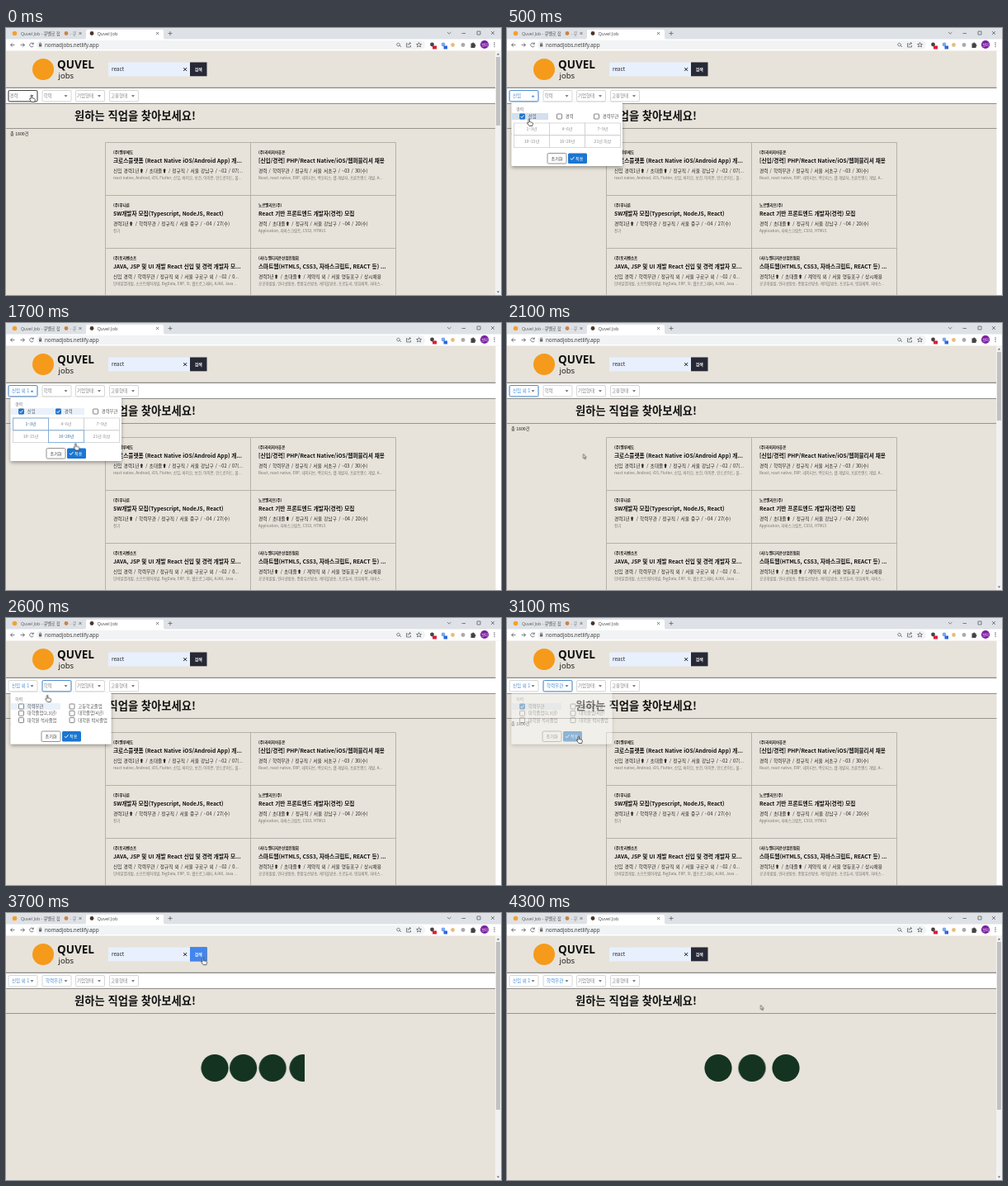
These frames come from a looping animation (600 px wide and 323 px high, 4400 ms). An HTML page:

```html
<!DOCTYPE html>
<html lang="ko">
<head>
<meta charset="utf-8">
<title>Job search</title>
<style>
  html, body { margin: 0; width: 100%; height: 100%; overflow: hidden; background: #e7e3da; }
  svg { display: block; width: 100%; height: 100%; }
  text { font-family: "Noto Sans CJK KR", "Noto Sans CJK", "DejaVu Sans", sans-serif; white-space: pre; }
  .ui { font-family: "Open Sans", "Noto Sans CJK KR", sans-serif; }
  .mid { text-anchor: middle; }
  .bold { font-weight: 700; }
  .meta { word-spacing: .5px; }
  .icon { fill: none; stroke: #5f6368; stroke-width: .8; }
</style>
</head>
<body>
<svg id="stage" viewBox="0 0 600 323"></svg>
<script>
const LOOP = 4400;
const BLUE = '#3f87d2', GRAY = '#808085', INK = '#111';

const rect = (x, y, w, h, fill, more = '') =>
  `<rect x="${x}" y="${y}" width="${w}" height="${h}" fill="${fill}" ${more}/>`;
const text = (x, y, size, str, fill = INK, cls = '') =>
  `<text x="${x}" y="${y}" font-size="${size}" fill="${fill}" class="${cls}">${str}</text>`;
const path = (d, more = 'class="icon"') => `<path d="${d}" ${more}/>`;
const dot = (x, y, r, fill) => `<circle cx="${x}" cy="${y}" r="${r}" fill="${fill}"/>`;
// Visible only between the given pairs of times (ms).
const during = (times, body) => `<g data-on="${times}">${body}</g>`;
const cross = (x, y, r) => path(`M${x - r} ${y - r}l${2 * r} ${2 * r}m0 ${-2 * r}l${-2 * r} ${2 * r}`);

function browser() {
  return rect(0, 0, 600, 14, '#dee1e6') + rect(0, 13.5, 600, 14, '#fff') +
    path('M94 14q3 0 3-3V4q0-2 2-2h90q2 0 2 2v7q0 3 3 3z', 'fill="#fff"') +
    dot(10.5, 6.5, 2.8, '#f5a02c') + text(18, 8.6, 5.2, 'Quvel Job - 큐벨로 잡', '#555', 'ui') +
    dot(73, 6.5, 2.4, '#c98445') + text(77.5, 8.6, 5.2, '- 큐', '#888', 'ui') + cross(90, 6.5, 1.5) +
    dot(104, 6.5, 2.4, '#4a3529') + text(110.5, 8.6, 5.6, 'Quvel Job', '#444', 'ui') + cross(183.5, 6.5, 1.5) +
    path('M196.5 6.5h5m-2.5-2.5v5M535 5l2.2 2.2L539.4 5M552.5 6.5h4.5M571 4h4v4h-4z') + cross(590, 6, 2) +
    path('M10.5 20.5H5.5m2.3-2.3l-2.3 2.3l2.3 2.3M17.5 20.5h5m-2.3-2.3l2.3 2.3l-2.3 2.3M33 19a2.4 2.4 0 1 0 .3 2.5m0-4v2h-2') +
    rect(37, 15, 471, 11, '#f1f3f4', 'rx="5.5"') +
    rect(40, 19.7, 3.2, 2.8, '#666') + path('M40.6 20v-1a1 1 0 0 1 2 0v1') +
    text(47, 22.7, 6.3, 'nomadjobs.netlify.app', '#333', 'ui') +
    path('M477 21l2 2M475.5 18.3a1.8 1.8 0 1 0 .1 0M486.5 18.5h-1v4.5h5v-2M487 21q0-2.5 3.5-2.5m-1.5-1.5l1.5 1.5l-1.5 1.5') +
    path('M500.5 17.5l.9 2h2.1l-1.6 1.4l.6 2.1l-2-1.2l-2 1.2l.6-2.1l-1.6-1.4h2.1z') +
    dot(516.5, 20, 2.4, '#444') + rect(517, 21.5, 5, 4, '#d81e3a') +
    dot(530, 20, 2.4, '#7ba8ef') + rect(530.5, 21.5, 4.5, 4, '#2b66df') +
    dot(541.5, 20.5, 2.4, '#e9bd78') + dot(554, 20.5, 2.4, '#a9a9ae') +
    path('M563.5 18.5h1.7a1 1 0 1 1 2 0h1.3v1.8a1 1 0 1 1 0 2v1.7h-5z', 'fill="#444"') +
    dot(580, 20, 5.1, '#7b1fa2') + text(580, 21.6, 4.2, '보미', '#fff', 'mid') +
    [18, 20.3, 22.6].map(y => dot(592, y, .7, '#555')).join('');
}

function header() {
  const button = fill => rect(223, 41.5, 20.5, 16.8, fill) + text(233.2, 51.8, 4.9, '검색', '#fff', 'mid bold');
  return dot(45, 50, 13, '#f59a1b') +
    text(62, 48.8, 13.5, 'QUVEL', INK, 'ui bold') + text(63.5, 60.8, 9.6, 'jobs', INK, 'ui') +
    rect(124, 41.5, 99, 16.8, '#e8f0fe') + text(128, 52.2, 6.4, 'react', '#222') +
    path('M215.2 48l4 4m0-4l-4 4', 'fill="none" stroke="#222"') +
    button('#282936') + during('3500 3800', button('#4285ee'));
}

function select(x, label, states) {
  const arrow = path(`M${x + 26.5} 81.2h4l-2 2.2z`, 'fill="#666"');
  return rect(x, 75.5, 35, 13.4, '#fff', 'rx="1.5" stroke="#ccc" stroke-width=".8"') + arrow +
    states.map(([times, value]) => during(times, value
      ? text(x + 4, 83.8, 5.5, value, BLUE) : text(x + 1.4, 83.8, 5.5, label, GRAY))).join('');
}
const outline = (x, color) => rect(x, 75.5, 35, 13.4, 'none', `rx="1.5" stroke="${color}" stroke-width=".9"`);

function filters() {
  return rect(0, 72, 600, 19.5, '#fff') +
    rect(0, 71.8, 600, .9, '#5c5a58') + rect(0, 91, 600, .8, '#767370') + rect(0, 121, 600, .8, '#85817c') +
    select(3, '경력', [['0 400'], ['400 800', '신입'], ['800 4400', '신입 외 1']]) +
    select(44, '학력', [['0 2700'], ['2700 4400', '학력무관']]) +
    select(84.5, '기업형태', [['0 4400']]) + select(125.5, '고용형태', [['0 4400']]) +
    during('0 100', outline(3, '#333')) + during('100 2300', outline(3, BLUE)) +
    during('2300 3300', outline(44, BLUE)) +
    during('100 1900', rect(28, 80, 7, 4.5, '#fff') + path('M29.5 83.4h4l-2-2.2z', `fill="${BLUE}"`)) +
    text(83, 110.6, 13.3, '원하는 직업을 찾아보세요!', INK, 'bold');
}

// company, title, details, tags
const jobs = [
  ['(주)벨루에도', '크로스플랫폼 (React Native iOS/Android App) 개...',
    '신입 경력1년⬆ / 초대졸⬆ / 정규직 / 서울 강남구 / ~02 / 07(...',
    'react native, Android, iOS, Flutter, 신입, 바이오, 보건, 아이폰, 안드로이드, 풀...'],
  ['(주)라미지아휴온', '[신입/경력] PHP/React Native/iOS/웹퍼블리셔 채용',
    '경력 / 학력무관 / 정규직 / 서울 서초구 / ~03 / 30(수)',
    'React, react native, ERP, 네이티브, 백오피스, 웹 개발자, 프론트엔드 개발, A...'],
  ['(주)푸나른', 'SW개발자 모집(Typescript, NodeJS, React)',
    '경력1년⬆ / 학력무관 / 정규직 / 서울 중구 / ~04 / 27(수)', '전기'],
  ['노르벨리프(주)', 'React 기반 프론트엔드 개발자(경력) 모집',
    '경력 / 초대졸⬆ / 정규직 / 서울 강남구 / ~04 / 20(수)',
    'Application, 자바스크립트, CSS3, HTML5'],
  ['(주)토리벤소프', 'JAVA, JSP 및 UI 개발 React 신입 및 경력 개발자 모...',
    '신입 경력 / 학력무관 / 정규직 외 / 서울 구로구 외 / ~02 / 0...',
    '모바일앱개발, 소프트웨어개발, BigData, ERP, SI, 웹프로그래머, AJAX, Java ...'],
  ['(사)누벨디지온산업인협회', '스마트웹(HTML5, CSS3, 자바스크립트, REACT 등) ...',
    '경력5년⬆ / 초대졸⬆ / 계약직 외 / 서울 영등포구 / 상시채용',
    '공공개발발, 인터넷방송, 종합유선방송, 케이블방송, 프로듀서, 영화제작, 자바스...'],
];

function results() {
  const cards = jobs.map(([company, title, details, tags], i) => {
    const x = i % 2 ? 306 : 130, y = 138.5 + 64 * (i >> 1);
    return text(x, y + 13, 4.5, company, INK, 'bold') +
      text(x, y + 24.5, 6.65, title, INK, 'bold') +
      text(x, y + 36, 5.7, details, '#222', 'meta') +
      text(x, y + 44.6, 4.5, tags, '#77736e');
  }).join('');
  return text(5, 130, 5.2, '총 1800건', '#222') +
    path('M120.5 323V138.5h352V323M296.5 138.5V323M120.5 202.5h352M120.5 266.5h352',
      'fill="none" stroke="#b0aca6" stroke-width=".9"') + cards;
}

function scrollbar() {
  const thumb = h => rect(594, 35, 5, h, '#c1c1c1');
  return rect(593, 27.5, 7, 295.5, '#f1f1f1') +
    path('M594.8 32.5l1.7-2l1.7 2zM594.8 318.5l1.7 2l1.7-2z', 'fill="#666"') +
    during('0 3700', thumb(83)) + during('3700 4400', thumb(203));
}

function option(x, y, label, checkedAt) {
  const box = rect(x - 3, y - 3, 6, 6, '#fff', 'rx=".8" stroke="#666" stroke-width=".8"');
  const tick = rect(x - 3.3, y - 3.3, 6.6, 6.6, '#1976d2', 'rx=".8"') +
    path(`M${x - 2} ${y}l1.4 1.5l2.6-3`, 'fill="none" stroke="#fff"');
  return box + (checkedAt ? during(`${checkedAt} 4400`, tick) : '') + text(x + 7.3, y + 2, 5.3, label, '#555');
}

function actions(x, y) {
  return rect(x, y, 23, 12.5, '#fff', 'rx="1.5" stroke="#777" stroke-width=".8"') +
    text(x + 11.5, y + 8.1, 5.1, '초기화', '#333', 'mid') +
    rect(x + 25, y, 23, 12.5, '#1976d2', 'rx="1.5"') +
    path(`M${x + 28} ${y + 6.2}l1.5 1.7l3-3.5`, 'fill="none" stroke="#fff"') +
    text(x + 34, y + 8.1, 5.1, '적용', '#fff');
}

const panel = (w, h) => rect(5.5, 90, w, h, '#fff', 'rx="1" filter="url(#shadow)"');

function careerPanel() {
  const band = (x, w, fill = '#e9f1fa') => rect(x, 103, w, 8, fill);
  const names = ['1~3년', '4~6년', '7~9년', '10~15년', '16~20년', '21년 이상'];
  const cell = (i, color) => {
    const x = 8.5 + 43 * (i % 3), y = i < 3 ? 115 : 129.8;
    return rect(x, y, 43, 14.8, 'none', `stroke="${color || '#d0d0d0'}" stroke-width=".8"`) +
      text(x + 21.5, y + 9.2, 5, names[i], color || '#8c8c8c', 'mid');
  };
  return panel(134.5, 77) + text(11, 99.6, 5, '경력', GRAY) +
    during('300 4400', band(6, 44)) + during('400 700', band(6, 44, '#d3e0ee')) +
    during('700 4400', band(50, 45)) +
    option(18.5, 107, '신입', 400) + option(63.5, 107, '경력', 800) + option(108.5, 107, '경력무관') +
    names.map((_, i) => cell(i)).join('') +
    during('1100 4400', cell(0, '#76a9dd')) + during('1400 4400', cell(4, '#76a9dd')) + actions(49, 151.5);
}

function schoolPanel() {
  return panel(122, 62.5) + text(11, 99.6, 5, '학력', GRAY) +
    during('2600 4400', rect(6, 103, 60, 8, '#e9f1fa')) +
    option(18.5, 107, '학력무관', 2700) + option(80, 107, '고등학교졸업') +
    option(18.5, 115.3, '대학졸업(2,3년)') + option(80, 115.3, '대학졸업(4년)') +
    option(18.5, 123.6, '대학원 석사졸업') + option(80, 123.6, '대학원 박사졸업') + actions(43, 137);
}

const pointers =
  during('0 2000 2300 3250 3500 3800', path(
    'M0 .6q.8-1 1.5 0v3l3 .7q1 .4.8 1.5l-.6 2.7H.9L-1.4 5.3q-.2-1 .7-.8l.7.6z',
    'fill="#fff" stroke="#222" stroke-width=".7"')) +
  during('2000 2300 3250 3500 3800 4400', path('M0 0v5.2l1.2-1l.9 2l.9-.4l-.9-1.9h1.6z',
    'fill="#fff" stroke="#222" stroke-width=".6"'));

const stage = document.getElementById('stage');
stage.innerHTML = `<defs>
  <filter id="shadow" x="-10%" y="-10%" width="120%" height="130%">
    <feDropShadow dx="0" dy="2" stdDeviation="2" flood-opacity=".35"/></filter>
  <clipPath id="window"><rect x="232" y="165" width="130" height="45"/></clipPath></defs>` +
  rect(0, 0, 600, 323, '#e7e3da') + browser() + header() + filters() +
  during('0 3700', results()) +
  during('3700 4400', `<g clip-path="url(#window)">${
    [253, 287.5, 323, 360].map(x => `<circle class="bead" cx="${x}" cy="187.5" r="16.6" fill="#143321"/>`).join('')}</g>`) +
  rect(593.5, 27.5, 6.5, 295.5, '#fff') + during('0 100 2000 2400 3200 4400', scrollbar()) +
  `<g id="career">${careerPanel()}</g><g id="school">${schoolPanel()}</g><g id="pointer">${pointers}</g>`;

// Each frame is [ms, properties]; the last pose is held to the end of the loop.
function play(el, frames, easing = 'linear') {
  const keys = frames.map(([ms, props]) => ({ ...props, offset: ms / LOOP, easing }));
  if (keys[keys.length - 1].offset < 1) keys.push({ ...keys[keys.length - 1], offset: 1 });
  el.animate(keys, { duration: LOOP, iterations: Infinity });
}

for (const el of stage.querySelectorAll('[data-on]')) {
  const times = el.dataset.on.split(' ').map(Number);
  const frames = times.map((ms, i) => [ms, { opacity: i % 2 ? 0 : 1 }]).filter(([ms]) => ms < LOOP);
  if (times[0] > 0) frames.unshift([0, { opacity: 0 }]);
  play(el, frames, 'steps(1, end)');
}

function popover(id, origin, open, close, gone) {
  const el = document.getElementById(id);
  el.style.transformOrigin = origin;
  const off = { opacity: 0, transform: 'scale(.8)' }, on = { opacity: 1, transform: 'scale(1)' };
  play(el, [[0, off], [open, off], [open + 150, on], [close, on], [gone, { ...on, opacity: 0 }]]);
}
popover('career', '20px 90px', 80, 1850, 2000);
popover('school', '60px 90px', 2350, 3000, 3180);

const route = [
  [0, 30, 81], [100, 30, 81], [300, 26, 110], [600, 26, 110], [800, 72, 106], [900, 72, 106],
  [1100, 31, 120], [1200, 31, 120], [1400, 74, 135], [1500, 74, 135], [1700, 83.5, 145.5], [1900, 85, 157],
  [2100, 92.5, 158.5], [2200, 92.5, 158.5], [2400, 72, 80], [2500, 72, 80], [2700, 27, 106], [2800, 27, 106],
  [3000, 86, 143], [3200, 86, 143], [3600, 238, 54], [3700, 238, 54], [4100, 307.5, 111.5],
];
play(document.getElementById('pointer'),
  route.map(([ms, x, y]) => [ms, { transform: `translate(${x}px, ${y}px)` }]));

const rest = [256, 297, 338, 379];
stage.querySelectorAll('.bead').forEach((el, i) => {
  const shift = rest[i] - el.getAttribute('cx');
  const still = { transform: 'translateX(0px)' };
  play(el, [[0, still], [3700, still], [3900, { transform: `translateX(${shift}px)` }]], 'ease-out');
});
</script>
</body>
</html>
```
